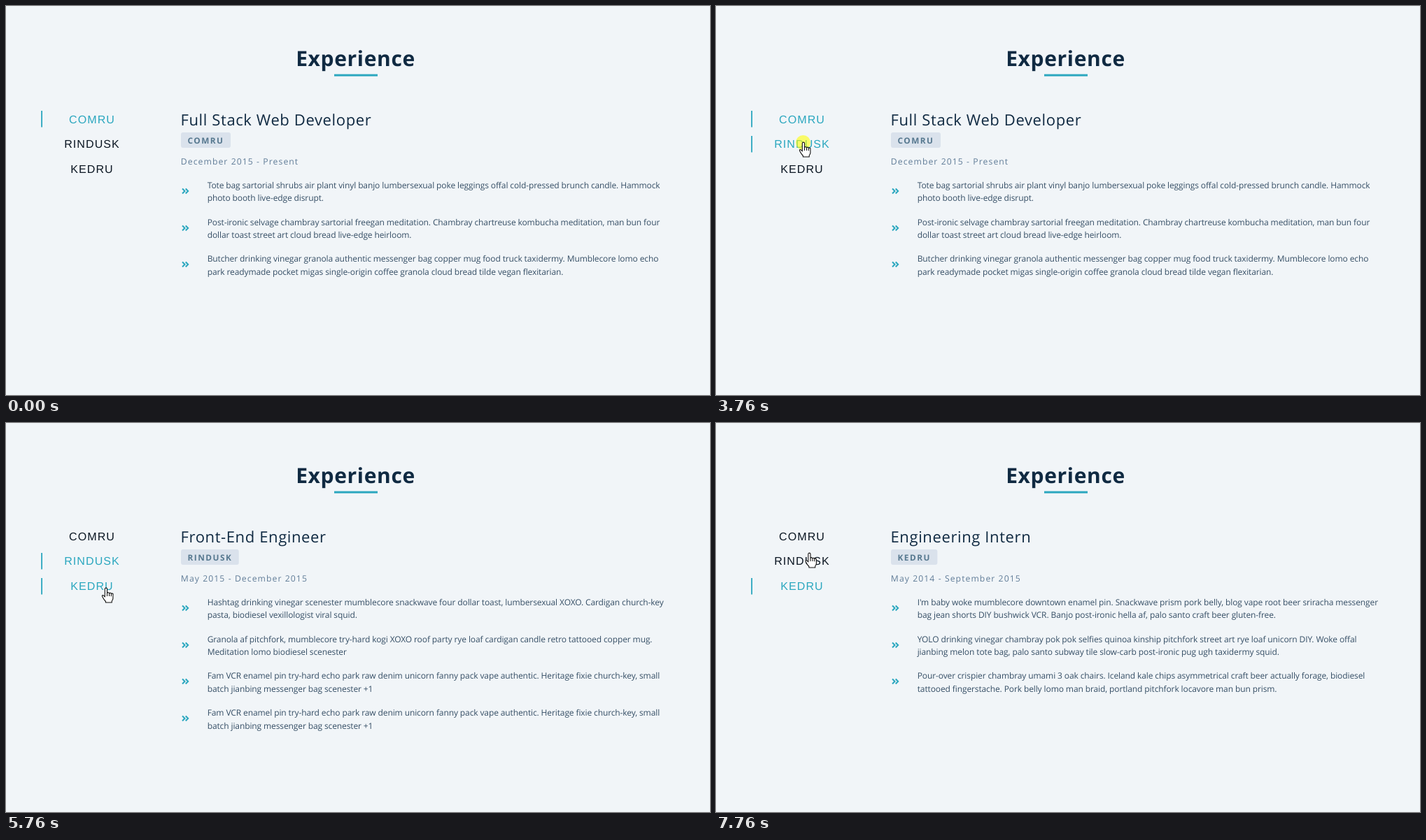
An HTML page for the animation above (8 s loop, 1006 by 557 pixels).

```html
<!DOCTYPE html>
<html lang="en">
<head>
<meta charset="utf-8">
<title>Experience</title>
<style>
  html, body { margin: 0; width: 100%; height: 100%; overflow: hidden; background: #f1f5f8; }
  svg { display: block; width: 100%; height: 100%; text-rendering: geometricPrecision;
        font-family: "Open Sans", "Noto Sans", sans-serif; --teal: #2ba7bf; }
  .heading { font-size: 30px; font-weight: 700; letter-spacing: .65px; fill: #102a42; text-anchor: middle; }
  .tab { font: 16px "Liberation Sans", Arial, sans-serif; letter-spacing: 1.1px; text-anchor: middle; }
  .role { font-size: 22px; letter-spacing: .62px; fill: #102a42; }
  .chip { font-size: 11.8px; font-weight: 700; letter-spacing: 1.5px; fill: #56788f; }
  .date { font-size: 12.2px; letter-spacing: 1.08px; fill: #617d98; }
  .duty { font-size: 12px; letter-spacing: -.11px; fill: #364f66; }
  .arrows { fill: none; stroke: var(--teal); stroke-width: 2; }
  .cursor { fill: #fff; stroke: #111; stroke-width: 1.1; stroke-linejoin: round; }
</style>
</head>
<body>
<svg viewBox="0 0 1006 557">
  <text class="heading" x="499.5" y="86">Experience</text>
  <rect x="469" y="97.6" width="62" height="3" fill="var(--teal)"/>
  <g id="tabs"></g>
  <g id="panels"></g>
  <circle id="spot" cx="124.5" cy="195.5" r="10.5" fill="#ff0" opacity=".58"/>
  <g class="cursor">
    <path id="arrow" d="M0 0V16L3.8 12.5L6.3 18L8.8 17L6.4 11.5H11.4Z"/>
    <path id="beam" d="M-3 -7H3M0 -7V7M-3 7H3"/>
    <path id="hand" d="M-1.7 13V1.7a1.6 1.6 0 0 1 3.2 0V8a1.5 1.5 0 0 1 3 .4a1.4 1.4 0 0 1 2.8 .6
      a1.3 1.3 0 0 1 2.6 .8V15q0 2-1.7 4V21H-.6V19.5Q-3 17-5.4 12.4q-.6-1.6 .8-1.8q1.2 0 2.9 2.4Z
      M1.5 8v4M4.5 8.6v3.4M7.3 9.2v3"/>
  </g>
</svg>
<script>
const LOOP = 8000, FRAME = 250, FADE = 300, CLICK = 3750;

// A tab lights up at `hover`, opens its panel at `open`, and fades when the next one opens.
const jobs = [
  { name: "COMRU", hover: -FADE, open: 0,
    role: "Full Stack Web Developer", date: "December 2015 - Present", duties: [
    ["Tote bag sartorial shrubs air plant vinyl banjo lumbersexual poke leggings offal cold-pressed brunch candle. Hammock",
     "photo booth live-edge disrupt."],
    ["Post-ironic selvage chambray sartorial freegan meditation. Chambray chartreuse kombucha meditation, man bun four",
     "dollar toast street art cloud bread live-edge heirloom."],
    ["Butcher drinking vinegar granola authentic messenger bag copper mug food truck taxidermy. Mumblecore lomo echo",
     "park readymade pocket migas single-origin coffee granola cloud bread tilde vegan flexitarian."]] },
  { name: "RINDUSK", hover: 1820, open: 3790,
    role: "Front-End Engineer", date: "May 2015 - December 2015", duties: [
    ["Hashtag drinking vinegar scenester mumblecore snackwave four dollar toast, lumbersexual XOXO. Cardigan church-key",
     "pasta, biodiesel vexillologist viral squid."],
    ["Granola af pitchfork, mumblecore try-hard kogi XOXO roof party rye loaf cardigan candle retro tattooed copper mug.",
     "Meditation lomo biodiesel scenester"],
    ...Array(2).fill(
      ["Fam VCR enamel pin try-hard echo park raw denim unicorn fanny pack vape authentic. Heritage fixie church-key, small",
       "batch jianbing messenger bag scenester +1"])] },
  { name: "KEDRU", hover: 5320, open: 6160,
    role: "Engineering Intern", date: "May 2014 - September 2015", duties: [
    ["I'm baby woke mumblecore downtown enamel pin. Snackwave prism pork belly, blog vape root beer sriracha messenger",
     "bag jean shorts DIY bushwick VCR. Banjo post-ironic hella af, palo santo craft beer gluten-free."],
    ["YOLO drinking vinegar chambray pok pok selfies quinoa kinship pitchfork street art rye loaf unicorn DIY. Woke offal",
     "jianbing melon tote bag, palo santo subway tile slow-carb post-ironic pug ugh taxidermy squid."],
    ["Pour-over crispier chambray umami 3 oak chairs. Iceland kale chips asymmetrical craft beer actually forage, biodiesel",
     "tattooed fingerstache. Pork belly lomo man braid, portland pitchfork locavore man bun prism."]] }
];

// Pointer stops: time, x, y
const stops = [
  [1250, 975, 544], [1500, 764, 479], [1750, 281, 261], [2000, 185, 198], [2250, 125, 195],
  [5250, 130, 219], [5500, 143, 236], [7750, 133.5, 186]
];

const $ = id => document.getElementById(id);
const show = (el, on) => el.style.display = on ? "" : "none";
const text = (cls, x, y, s) => `<text class="${cls}" x="${x}" y="${y}">${s}</text>`;
const tabTop = i => 150 + 36 * i;
const fade = ms => Math.min(1, Math.max(0, ms / FADE));

const duty = (lines, i) => {
  const top = 261 + 52.7 * i;
  return `<path class="arrows" d="M252 ${Math.round(top + 4) - 3.5}l3.5 3.5l-3.5 3.5m4.7-7l3.5 3.5l-3.5 3.5"/>` +
    lines.map((s, n) => text("duty", 287.7, Math.round(top + 18.4 * n), s)).join("");
};

$("tabs").innerHTML = jobs.map((job, i) =>
  `<g><rect y="${tabTop(i)}" height="23.5" fill="var(--teal)"/>` +
  text("tab", 123, Math.round(167.7 + 35.7 * i), job.name) + "</g>").join("");

$("panels").innerHTML = jobs.map(job => "<g>" +
  text("role", 249.5, 170.5, job.role) +
  '<rect x="250" y="181" height="22" rx="3" fill="#dae2ec"/>' +
  text("chip", 259.5, 197, job.name) +
  text("date", 249.8, 227, job.date) +
  job.duties.map(duty).join("") + "</g>").join("");

for (const panel of $("panels").children) {
  const label = panel.querySelector(".chip");
  panel.querySelector("rect").setAttribute("width", label.getComputedTextLength() + 19);
}

function highlight(tab, level) {
  const [bar, label] = tab.children;
  const width = 1 + .8 * level;
  bar.setAttribute("x", 52 - width);
  bar.setAttribute("width", width);
  bar.style.opacity = level;
  label.style.fill = `color-mix(in srgb, var(--teal) ${level * 100}%, #0b1622)`;
}

function pointerKind(x, y) {
  if (x > 52 && x < 194 && jobs.some((_, i) => y >= tabTop(i) && y < tabTop(i) + 24)) return "hand";
  return x > 250 && x < 950 && y > 150 && y < 445 ? "beam" : "arrow";
}

function drawPointer(t) {
  const stop = stops.findLast(s => s[0] <= t);
  const kind = stop && pointerKind(stop[1], stop[2]);
  for (const id of ["arrow", "beam", "hand"]) show($(id), id === kind);
  if (kind) $(kind).setAttribute("transform", `translate(${stop[1]} ${stop[2]})`);
}

function draw(now) {
  const t = Math.floor((now % LOOP + 20) / FRAME) * FRAME % LOOP;
  const current = jobs.findLastIndex(job => job.open <= t);
  jobs.forEach((job, i) => {
    const end = jobs[i + 1]?.open ?? LOOP;
    show($("panels").children[i], i === current);
    highlight($("tabs").children[i], fade(t - job.hover) - fade(t - end));
  });
  show($("spot"), t === CLICK);
  drawPointer(t);
  requestAnimationFrame(draw);
}
draw(0);
</script>
</body>
</html>
```
